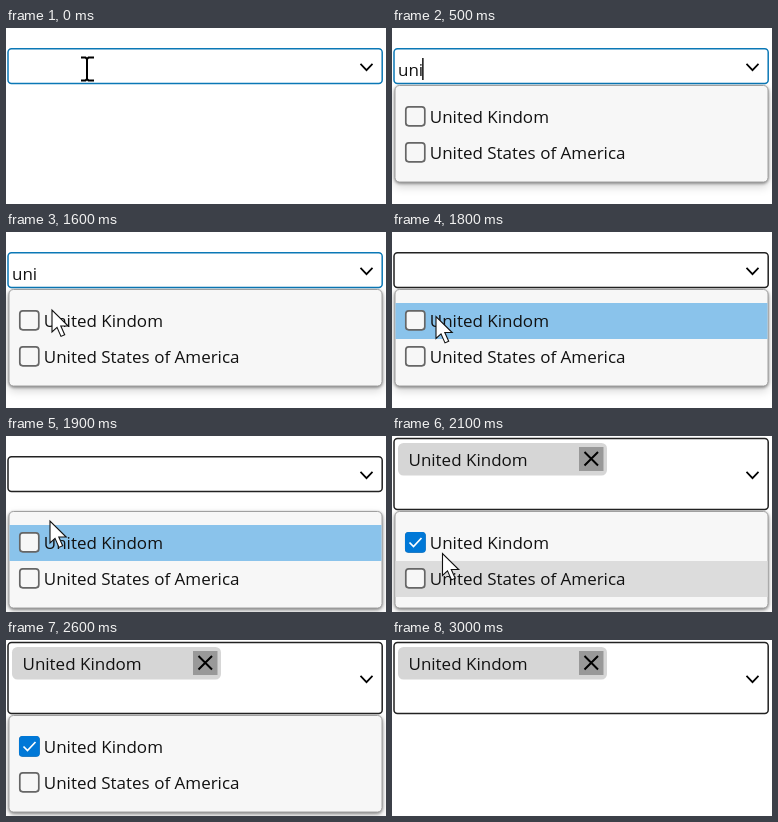
Recreate the animation shown at these times as an HTML page. Size 380 by 176 pixels, loop 3.1 s.

```html
<!DOCTYPE html>
<html lang="en">
<head>
<meta charset="utf-8">
<title>Multi-select combo box</title>
<style>
  html, body { margin: 0; width: 100%; height: 100%; overflow: hidden; background: #fff; }
  svg { display: block; width: 380px; height: 176px; }
  text { font: 17px "Open Sans", "Noto Sans", sans-serif; fill: #111; }
  .line { fill: none; stroke: #000; }
  #panel {
    fill: #f7f7f7; stroke: #a0a0a0;
    filter: drop-shadow(0 1px 1.5px rgba(0, 0, 0, .45)) drop-shadow(0 4px 4px rgba(0, 0, 0, .16));
  }
  .check { fill: #f7f7f7; stroke: #666; stroke-width: 1.7; }
</style>
</head>
<body>
<svg viewBox="0 0 380 176">
  <rect id="field" x="2" width="374.2" rx="3.5" fill="#fff" stroke-width="1.5"/>
  <path id="chevron" class="line" d="M-6 -3.2L0 3.2L6 -3.2" stroke-width="1.7"/>
  <text id="query" x="6" y="48"></text>
  <path id="caret" class="line" d="M0 30V52" stroke-width="1.4"/>
  <g id="chip">
    <rect x="6" y="7" width="209" height="32.5" rx="5.5" fill="#d6d6d6"/>
    <text x="16.5" y="30">United Kindom</text>
    <rect x="187" y="11" width="24.5" height="24" fill="#999"/>
    <path class="line" d="M192.5 16L206 29.5M206 16L192.5 29.5" stroke-width="2"/>
  </g>
  <g id="popup">
    <rect id="panel" x="3" y="57.5" width="373" height="96.5" rx="4.5"/>
    <rect id="hover" x="3.5" width="372" height="36"/>
    <rect class="check" x="13.8" y="78.8" width="19" height="19" rx="3"/>
    <g id="tick">
      <rect x="13" y="78" width="20.8" height="20.8" rx="3.5" fill="#0078d7"/>
      <path class="line" d="M17.5 88.5L21.5 92.5L29.5 84" style="stroke:#fff" stroke-width="1.7"/>
    </g>
    <text x="37.8" y="95">United Kindom</text>
    <rect class="check" x="13.8" y="114.8" width="19" height="19" rx="3"/>
    <text x="37.8" y="131">United States of America</text>
  </g>
  <path id="beam" class="line" d="M-6 -11.5H-1.5L0 -10L1.5 -11.5H7M0 -10V10M-6 11.5H-1.5L0 10L1.5 11.5H7" stroke-width="2"/>
  <path id="arrow" d="M0 0V22L5 17.4L9 26.4L12.7 24.8L8.8 16H16.2Z" fill="#fff" stroke="#111" stroke-width="1.1"/>
</svg>
<script>
const LOOP = 3100, STEP = 100;
const $ = id => document.getElementById(id);
const show = (id, on) => $(id).setAttribute("display", on ? "inline" : "none");
const move = (id, x, y) => $(id).setAttribute("transform", `translate(${x} ${y})`);
const set = (id, attrs) => {
  for (const name in attrs) $(id).setAttribute(name, attrs[name]);
};

// time, x, y of the mouse
const route = [
  [1100, 81, 41], [1300, 70, 53], [1600, 46, 78], [1700, 44, 84],
  [1900, 44, 85], [2000, 45, 90], [2200, 56, 145], [2300, 60, 160]
];

function mouseAt(t) {
  const i = route.findIndex(p => p[0] >= t);
  if (i < 1) return route[0].slice(1);
  const [a, b] = [route[i - 1], route[i]];
  const k = (t - a[0]) / (b[0] - a[0]);
  return [a[1] + (b[1] - a[1]) * k, a[2] + (b[2] - a[2]) * k];
}

function drawField(t) {
  const focused = t < 1800, chosen = t >= 2000;
  set("field", {
    y: chosen ? 2.5 : 20.7,
    height: chosen ? 71 : 34.8,
    stroke: focused ? "#0b78b6" : "#222"
  });
  move("chevron", 360.5, 39);
  const typed = t < 1800 ? "uni".slice(0, Math.max(0, Math.floor(t / 100))) : "";
  $("query").textContent = typed;
  show("caret", t >= 100 && t < 1200);
  move("caret", 6 + $("query").getComputedTextLength() - 0.3, 0);
  show("chip", chosen);
}

function drawPopup(t) {
  show("popup", t >= 200 && t < 3000);
  move("popup", 0, t < 1900 ? 0 : 18);
  show("tick", t >= 2000);
  const first = t >= 1700 && t < 2100;
  const second = t >= 2100 && t < 2400;
  show("hover", first || second);
  set("hover", {
    y: first ? 71 : 107,
    fill: t >= 1800 && t < 2000 ? "#8ac3eb" : "#dcdcdc"
  });
}

function drawMouse(t) {
  const [x, y] = mouseAt(t);
  const moving = t >= 1100 && t < 2400;
  const overField = y < 56;
  show("beam", t < 100 || moving && overField);
  show("arrow", moving && !overField);
  move("beam", x, y);
  move("arrow", x, y);
}

function draw(now) {
  const t = Math.floor((now % LOOP) / STEP) * STEP;
  drawField(t);
  drawPopup(t);
  drawMouse(t);
}

const start = performance.now();
function tick() {
  draw(performance.now() - start);
  requestAnimationFrame(tick);
}
tick();
</script>
</body>
</html>
```
